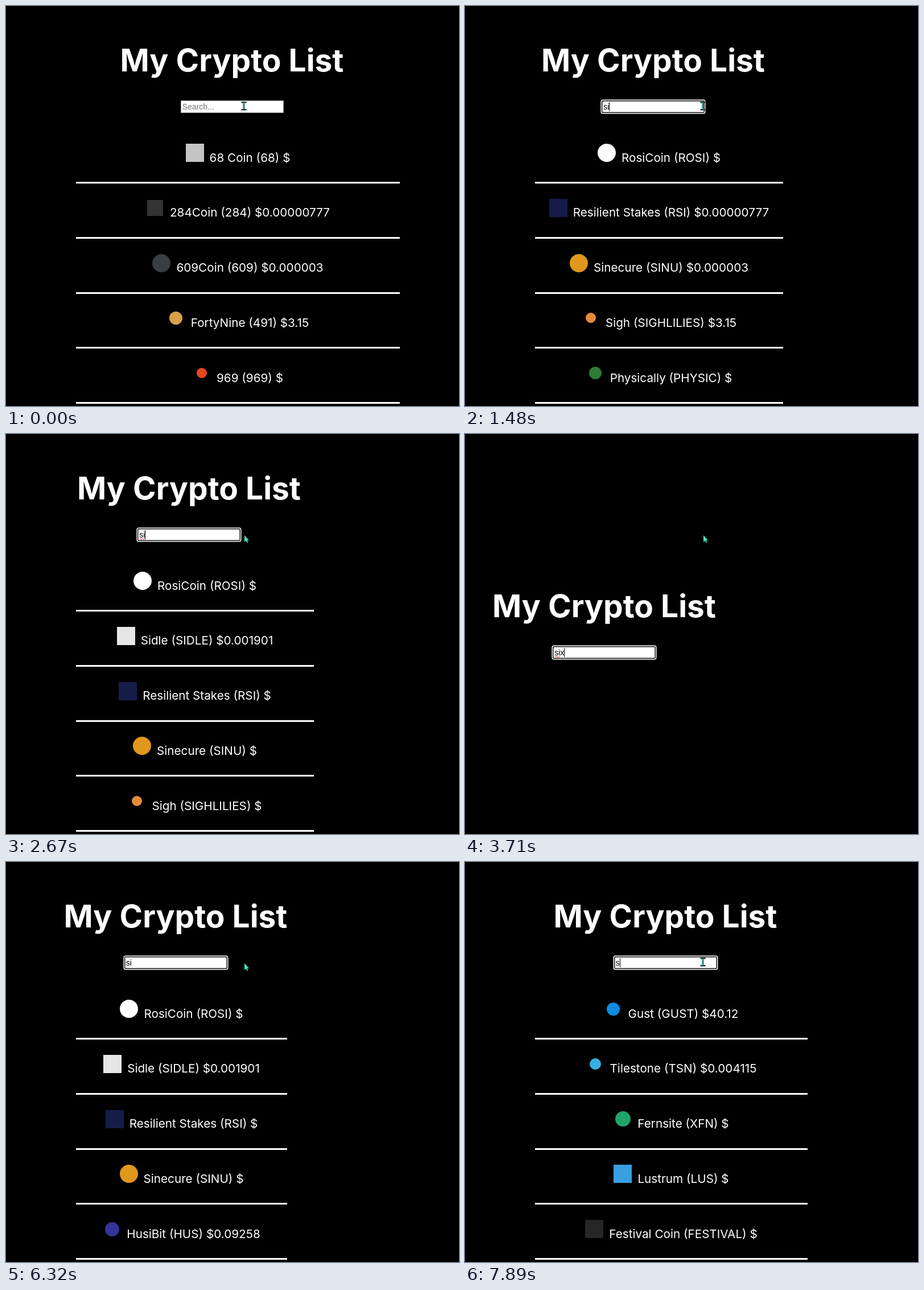
Animation of 796 by 703 pixels, one loop 8000 ms. Source, as an HTML page:

```html
<!DOCTYPE html>
<html lang="en">
<head>
<meta charset="utf-8">
<title>My Crypto List</title>
<style>
  html, body { margin: 0; width: 100%; height: 100%; overflow: hidden; background: #000; }
  body { position: relative; color: #fff; font-family: Inter, sans-serif; font-optical-sizing: none; }
  body * { box-sizing: border-box; }
  #head { position: absolute; width: 600px; }
  h1 { margin: 0; font-size: 55px; line-height: 66px; font-weight: 700; text-align: center; white-space: nowrap; }
  #field {
    position: absolute; left: 209.5px; top: 104px; width: 181px; height: 22px;
    padding-left: 3.2px; background: #fff; color: #000; box-shadow: inset 0 0 0 1px #999;
    font: 14px/22px "Liberation Sans", Arial, sans-serif;
  }
  #field.empty { color: #757575; }
  #field.focus { border-radius: 2px; box-shadow: inset 0 0 0 1.5px #101010, 0 0 0 1.5px #fff; }
  #caret { position: absolute; top: 3px; width: 1px; height: 16px; background: #000; }
  #squiggle { position: absolute; left: 3px; top: 16px; }
  .row { position: absolute; left: 123px; height: 70px; border-bottom: 3px solid #fff;
         display: flex; justify-content: center; white-space: nowrap; }
  .icon { width: 32px; height: 32px; margin-right: 10px; display: flex; align-items: center; justify-content: center; }
  .label { position: relative; top: 8.5px; font-size: 20.7px; line-height: 32px; }
  #mouse { position: absolute; left: 0; top: 0; }
</style>
</head>
<body>
<div id="head">
  <h1>My Crypto List</h1>
  <div id="field"><span id="text"></span><i id="caret"></i>
    <svg id="squiggle" width="12" height="5"><path d="M0 3.5l2-2 2 2 2-2 2 2 2-2" fill="none" stroke="#d22" /></svg>
  </div>
</div>
<div id="list"></div>
<svg id="mouse" width="796" height="703">
  <g id="beam" fill="#26343a">
    <path d="M413.5 168h9v2.5h-3v10.5h3v2.5h-9v-2.5h3v-10.5h-3z" />
    <path d="M417.3 169.5h1.6v12.5h-1.6z" fill="#2fb5a8" />
  </g>
  <path id="arrow" d="M419 178v12l2.6-2.4 2 3.6 1.8-1-1.8-3.5h3.4z" fill="#40e0c0" />
</svg>
<script>
const LOOP = 8000;
const $ = id => document.getElementById(id);

// label: [colour, size, round]
const coins = {
  "68 Coin (68)": ["#c4c4c4", 32, 0],
  "284Coin (284)": ["#333", 28, 0],
  "609Coin (609)": ["#3a3d42", 32, 1],
  "FortyNine (491)": ["#d9a04a", 23, 1],
  "969 (969)": ["#e8461f", 18, 1],
  "RosiCoin (ROSI)": ["#fff", 32, 1],
  "Resilient Stakes (RSI)": ["#161c48", 32, 0],
  "Sinecure (SINU)": ["#e0981c", 32, 1],
  "Sigh (SIGHLILIES)": ["#e58a3c", 18, 1],
  "Physically (PHYSIC)": ["#2f7a35", 22, 1],
  "Sidle (SIDLE)": ["#e6e6e6", 32, 0],
  "HusiBit (HUS)": ["#34349a", 25, 1],
  "Gust (GUST)": ["#0d8be0", 23, 1],
  "Tilestone (TSN)": ["#35b0e0", 20, 1],
  "Fernsite (XFN)": ["#1fa46a", 27, 1],
  "Lustrum (LUS)": ["#3a9fe0", 32, 0],
  "Festival Coin (FESTIVAL)": ["#262626", 32, 0],
};
const names = Object.keys(coins);
const pick = (ids, prices) => ids.map((id, i) => [names[id], prices[i] || ""]);

const stale = ["", "0.00000777", "0.000003", "3.15"];
const all = pick([0, 1, 2, 3, 4], stale);
const early = pick([5, 6, 7, 8, 9], stale);
const si = [5, 10, 6, 7, 8], sib = [5, 10, 6, 7, 11], s = [12, 13, 14, 15, 16];
const priced = pick(s, ["40.12", "0.004115"]);

// time, query, list width, rows
const states = [
  [0, "", 569, all],
  [1480, "si", 436, early],
  [1730, "si", 388, pick(si, ["0.017", "0.001901"])],
  [2000, "si", 418, pick(si, ["0.017", "0.001901"])],
  [2200, "si", 418, pick(si, ["", "0.001901"])],
  [3710, "six", 264, []],
  [4950, "si", 371, pick(sib, ["", "0.001901", "", "", "0.09258"])],
  [6870, "s", 439, pick(s, ["", "0.001901", "", "", "0.09258"])],
  [7020, "s", 394, priced],
  [7330, "s", 479, priced],
];
const blinks = [100, 640, 1480, 2000, 2510, 3030, 3540, 4240, 4750, 5260, 5780, 6320, 6870, 7380, 7890];

function rowHTML([name, price], i, width) {
  const [colour, size, round] = coins[name];
  const shape = `width:${size}px;height:${size}px;background:${colour};border-radius:${round * 50}%`;
  return `<div class="row" style="top:${242 + 96.75 * i}px;width:${width}px">
    <div class="icon"><div style="${shape}"></div></div>
    <span class="label">${name} $${price}</span></div>`;
}

function layout([, query, width, rows]) {
  const centre = 123 + width / 2 - 10.5;
  $("head").style.left = centre - 300 + "px";
  $("head").style.top = (rows.length ? 62 : 269) + "px";
  $("text").textContent = query || "Search...";
  $("field").classList.toggle("empty", !query);
  $("caret").style.left = 3 + (query ? $("text").offsetWidth : 0) + "px";
  $("list").innerHTML = rows.map((row, i) => rowHTML(row, i, width)).join("");
  const over = rows.length && Math.abs(418 - centre) < 91;
  $("beam").style.display = over ? "" : "none";
  $("arrow").style.display = over ? "none" : "";
}

let shown;
function draw() {
  const t = performance.now() % LOOP;
  const state = states.findLast(([start]) => start <= t);
  if (state !== shown) layout(shown = state);
  $("field").classList.toggle("focus", t >= 100);
  $("caret").hidden = blinks.filter(b => b <= t).length % 2 === 0;
  $("caret").style.display = $("caret").hidden ? "none" : "";
  $("squiggle").style.display = t >= 2510 && t < 3750 ? "" : "none";
  requestAnimationFrame(draw);
}
draw();
</script>
</body>
</html>
```
